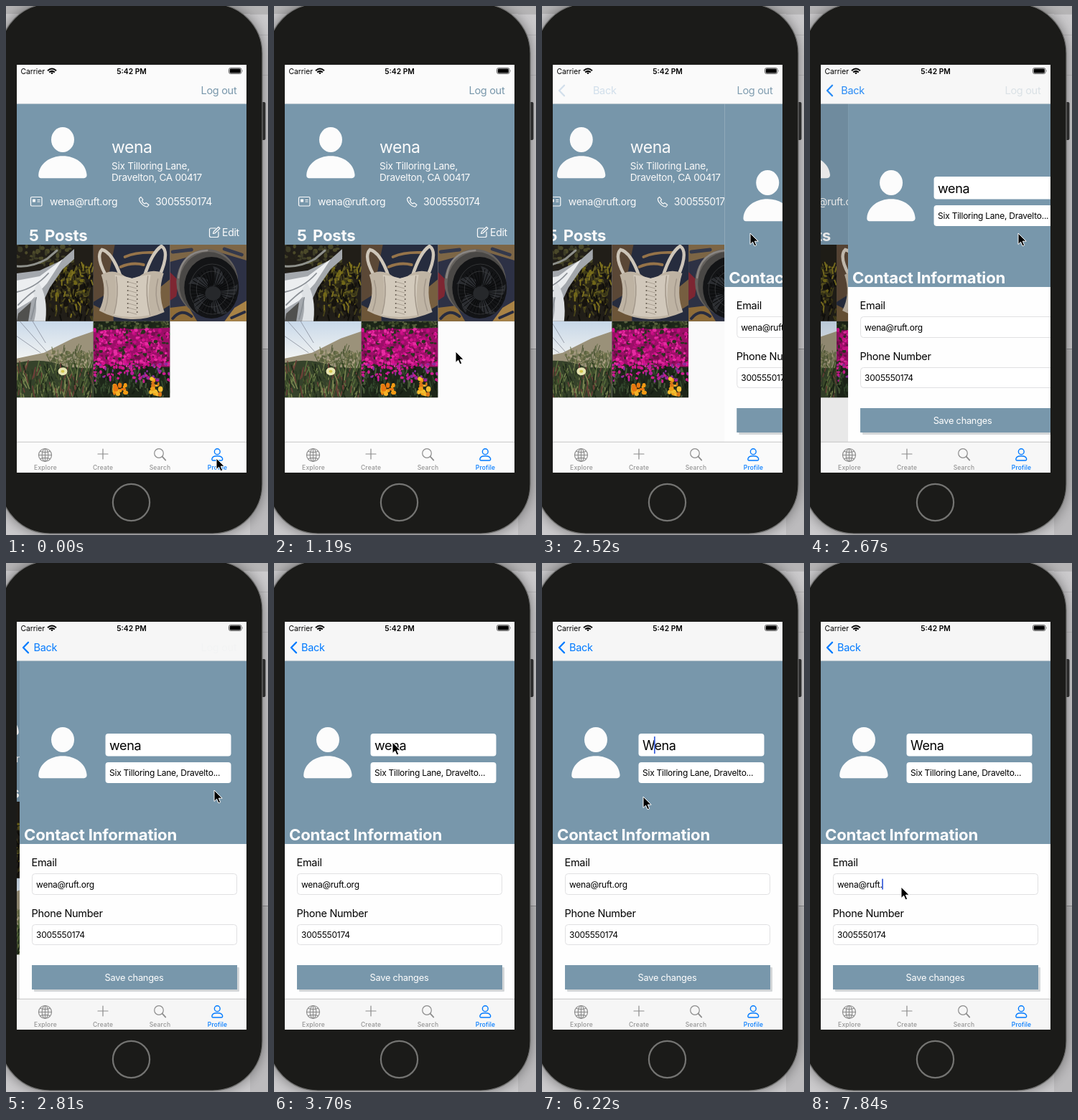
These frames come from a looping animation (365 px wide and 738 px high, 8 s). An HTML page:

```html
<!DOCTYPE html>
<html lang="en">
<head>
<meta charset="utf-8">
<title>Profile editing</title>
<style>
  html, body { margin: 0; width: 100%; height: 100%; overflow: hidden; background: #cbcacc; }
  #stage { display: block; width: 365px; height: 738px; }
  text { font-family: Inter, Roboto, "Liberation Sans", sans-serif; letter-spacing: -.02em; }
  .t14 { font-size: 14.5px; }
  .t12 { font-size: 12px; }
  .status { font-size: 10.3px; letter-spacing: 0; }
  .title { font-size: 22.2px; font-weight: 700; letter-spacing: -.01em; }
  .tab { font-size: 8.53px; font-weight: 500; letter-spacing: .02em; text-anchor: middle; }
  .line { fill: none; stroke-width: 1.2; stroke-linecap: round; stroke-linejoin: round; }
  .field { fill: #fff; stroke: #e0e0e2; }
</style>
</head>
<body>
<svg id="stage" viewBox="0 0 365 738">
  <defs>
    <clipPath id="screen"><rect x="15" y="82" width="320" height="569"/></clipPath>
    <linearGradient id="sky" x2="0" y2="1">
      <stop stop-color="#c9d9ea"/><stop offset=".5" stop-color="#f3f4f2"/>
    </linearGradient>
    <filter id="soft" x="0" y="0" width="1" height="1"><feGaussianBlur stdDeviation=".6"/></filter>
    <filter id="shade" x="-20%" y="-10%" width="140%" height="120%"><feGaussianBlur stdDeviation="9"/></filter>
    <g id="avatar" fill="#fcfcfc">
      <ellipse cx="34" cy="17.500" rx="16" ry="17.500"/>
      <path d="M5 71.300C1 71.300 0 69.500 .3 66C2 51 16 40.300 34 40.300S66 51 67.500 66C68 69.500 66 71.300 62 71.300Z"/>
    </g>
  </defs>

  <!-- desktop behind the phone -->
  <rect width="365" height="738" fill="#cbcacc"/>
  <rect width="365" height="11" fill="#b5b4b5"/>
  <path d="M340 11.500H365M340 40.500H365M340 96.500H365" stroke="#b9b8ba"/>
  <rect x="340" y="478" width="25" height="260" fill="#bcbbbd"/>
  <path d="M350 478.500H365" stroke="#8e8e90"/>

  <!-- phone -->
  <rect x="-8" y="-3" width="365" height="739" rx="69" opacity=".45" filter="url(#shade)"/>
  <rect x="355" y="134" width="6.500" height="53" rx="2" fill="#2b2b2b"/>
  <rect x="-8" y="-3" width="365" height="739" rx="69" fill="#1b1b19" stroke="#6f6f6e" stroke-width="1.200"/>
  <circle cx="174.500" cy="692.500" r="25.600" fill="none" stroke="#747472" stroke-width="2.200"/>

  <g clip-path="url(#screen)">
    <g id="list">
      <rect x="15" y="82" width="320" height="569" fill="#fcfcfc"/>
      <rect x="15" y="136.500" width="320" height="196.500" fill="#7897ab"/>
      <use href="#avatar" x="45" y="169"/>
      <g fill="#fcfcfc">
        <text x="147" y="205" font-size="23">wena</text>
        <g font-size="13.6">
          <text x="147" y="228">Six Tilloring Lane,</text>
          <text x="147" y="244">Dravelton, CA 00417</text>
        </g>
        <g font-size="14">
          <text x="61" y="278">wena@ruft.org</text>
          <text x="208" y="278">3005550174</text>
          <text x="301" y="320.500">Edit</text>
        </g>
        <text class="title" x="32" y="328">5</text>
        <text class="title" x="54" y="328">Posts</text>
        <rect x="37" y="269.500" width="4" height="4"/>
      </g>
      <g class="line" stroke="#fcfcfc">
        <rect x="34.500" y="266.500" width="15.500" height="12.500" rx="1.500"/>
        <path d="M44 270.500H47M44 273H47"/>
        <path d="M188 266.500L185.700 268.500C185 273 192 280.500 197 280L199 277.500L195.300 274.600L193.300 276C191.500 275.200 190 273.500 189.300 271.800L190.800 270Z"/>
        <path d="M292 310H285.500Q283.500 310 283.500 312V320.500Q283.500 322.500 285.500 322.500H294Q296 322.500 296 320.500V315M288.500 317.500L289.300 314.800L296 308.300L298 310.200L291.200 316.800Z"/>
      </g>
      <g id="photos"></g>
    </g>
    <rect id="dim" x="15" y="136.500" width="320" height="472" opacity="0"/>

    <g id="edit">
      <rect x="15" y="82" width="320" height="569" fill="#fefefe"/>
      <rect x="15" y="136.500" width="320" height="255.500" fill="#7897ab"/>
      <use href="#avatar" x="41" y="229"/>
      <rect x="134.500" y="238" width="175" height="31.500" rx="4" fill="#fff"/>
      <rect x="134.500" y="278" width="175" height="29" rx="4" fill="#fff"/>
      <text id="name" x="140" y="261" font-size="18">wena</text>
      <text class="t12" x="140" y="297">Six Tilloring Lane, Dravelto...</text>
      <text class="title" x="21" y="387" fill="#fefefe">Contact Information</text>
      <text class="t14" x="31.500" y="423">Email</text>
      <rect class="field" x="32.500" y="433.500" width="285" height="29" rx="4"/>
      <text id="mail" class="t12" x="38" y="452.500">wena@ruft.org</text>
      <text class="t14" x="31.500" y="493.500">Phone Number</text>
      <rect class="field" x="32.500" y="504.500" width="285" height="28" rx="4"/>
      <text class="t12" x="38" y="522.500">3005550174</text>
      <rect x="35" y="564" width="286" height="34" rx="1" fill="#d3d6d8"/>
      <rect x="32" y="561" width="286" height="34" fill="#7897ab"/>
      <text x="174.500" y="583" font-size="12.8" fill="#fefefe" text-anchor="middle">Save changes</text>
      <rect id="caret" width="1.800" rx=".5" fill="#3f63dc"/>
    </g>

    <!-- status and navigation bar -->
    <rect class="bar" x="15" y="82" width="320" height="54"/>
    <path d="M15 136.250H335" stroke="#c4c8ca" stroke-width=".5"/>
    <text class="status" x="20.500" y="94.500">Carrier</text>
    <text class="status" x="175" y="94.500" font-weight="600" text-anchor="middle">5:42 PM</text>
    <g fill="none" stroke="#000" stroke-width="2">
      <path d="M58 90.200Q64 84.800 70 90.200M60.200 92.500Q64 89.200 67.800 92.500"/>
      <path d="M62.200 93.200L64 95.300L65.800 93.200Q64 92 62.200 93.200Z" fill="#000" stroke="none"/>
    </g>
    <rect x="310.500" y="86.500" width="17.500" height="8" rx="2.200" fill="none" stroke="#555" stroke-width=".9"/>
    <rect x="311.700" y="87.500" width="15.100" height="6" rx="1.200"/>
    <path d="M329.200 89V92Q330.600 90.500 329.200 89Z" fill="#777"/>
    <text id="logout" class="t14" x="271.500" y="123" fill="#7897ab">Log out</text>
    <path id="chevron" class="line" d="M31 110.800L24 118L31 125.200" style="stroke-width:2.300"/>
    <text id="back" class="t14" x="38" y="123">Back</text>

    <!-- tab bar -->
    <rect class="bar" x="15" y="608" width="320" height="43"/>
    <path d="M15 608.250H335" stroke="#b8b8b8" stroke-width=".8"/>
    <g class="line" stroke="#8c8c8c">
      <circle cx="54.500" cy="626.500" r="9"/>
      <ellipse cx="54.500" cy="626.500" rx="4.300" ry="9"/>
      <path d="M54.500 617.500V635.500M45.500 626.500H63.500M47.500 621.300Q54.500 624 61.500 621.300M47.500 631.700Q54.500 629 61.500 631.700"/>
      <path d="M135 618V632M128 625H142"/>
      <circle cx="213" cy="624" r="6.300"/>
      <path d="M217.700 628.700L222.300 633.700" style="stroke-width:1.700"/>
    </g>
    <g class="line" stroke="#007aff" style="stroke-width:1.400">
      <circle cx="294.300" cy="621.700" r="3.900"/>
      <path d="M288.500 634Q286.500 634 287 631.500C288 626.500 300.500 626.500 301.600 631.500Q302 634 300 634Z"/>
    </g>
    <g fill="#949494">
      <text class="tab" x="55" y="647.300">Explore</text>
      <text class="tab" x="135" y="647.300">Create</text>
      <text class="tab" x="214.500" y="647.300">Search</text>
      <text class="tab" x="294.500" y="647.300" fill="#007aff">Profile</text>
    </g>
  </g>

  <path id="pointer" d="M0 0V15.500L3.600 12.200L6 17.800L8.700 16.700L6.300 11.200H11.200Z" stroke="#fff" stroke-width="1" stroke-linejoin="round"/>
</svg>

<script>
const $ = id => document.getElementById(id);

// ---- photos ----
let seed = 7;
const rand = (a = 0, b = 1) => {
  seed = (seed * 16807) % 2147483647;
  return a + (b - a) * seed / 2147483647;
};
const box = fill => `<rect width="107" height="107" fill="${fill}"/>`;
const shape = (d, fill) => `<path d="${d}" fill="${fill}"/>`;
const stroke = (d, color, w) => `<path d="${d}" fill="none" stroke="${color}" stroke-width="${w}" stroke-linecap="round"/>`;
const disc = (x, y, rx, ry, fill) => `<ellipse cx="${x}" cy="${y}" rx="${rx}" ry="${ry}" fill="${fill}"/>`;
const many = (n, make) => Array.from({ length: n }, (_, i) => make(i)).join("");
const pick = list => list[Math.floor(rand(0, list.length))];
const blobs = (n, [x0, y0, x1, y1], colors, r) => many(n, () =>
  disc(rand(x0, x1), rand(y0, y1), rand(r / 3, r), rand(r / 3, r), pick(colors)));
const blades = (n, [x0, y0, x1, y1], colors, h, w = 1.5) => many(n, () =>
  stroke(`M${rand(x0, x1)} ${rand(y0, y1)}l${rand(-h / 3, h / 3)} ${rand(-h, -h / 3)}`, pick(colors), w));

const waterfall = () => box("#211e18")
  + blobs(70, [0, 0, 80, 28], ["#3d3c26", "#4b4929", "#232018"], 4)
  + blobs(160, [46, 28, 100, 85], ["#5c5520", "#716719", "#2b2714", "#3b3818", "#16130e"], 4)
  + blades(90, [44, 30, 107, 107], ["#7d711f", "#15120d", "#45401b", "#0f0e0b"], 9, 2)
  + shape("M80 6L62 22L32 36L0 40V107H26L32 90L46 60L64 34L80 20Z", "#a4a8ad")
  + shape("M0 50L32 44L64 20L42 54L20 78L0 90Z", "#eceef0")
  + shape("M30 52Q44 72 40 107H24Q31 80 22 66Z", "#dfe2e5")
  + shape("M2 96L20 80L16 107H0Z", "#50504e")
  + stroke("M0 66Q25 61 44 40M2 84Q16 70 25 64M20 104Q25 86 27 74", "#8b9096", 1.800)
  + stroke("M0 30Q20 32 42 20L56 8", "#8f918c", 3);

const corset = () => box("#262c3e")
  + shape("M0 0H30L16 70L0 80Z", "#5b4836") + shape("M0 84L28 98V107H0Z", "#6d5638")
  + stroke("M44 17Q60 10 84 11M38 31Q54 24 70 28", "#96744a", 4)
  + shape("M90 62L107 48V84L94 92Z", "#775f40")
  + stroke("M17 42Q3 16 12 7Q26 10 38 44M71 44Q82 10 95 2Q107 10 92 44", "#cfc7ba", 4.500)
  + shape("M11 42Q28 32 44 44Q53 50 64 44Q81 32 98 40Q89 67 99 94Q74 105 52 104Q28 103 8 92Q20 68 11 42Z", "#bfb4a4")
  + shape("M30 42Q44 44 54 47Q70 42 80 42Q74 70 80 98Q52 104 28 98Q35 70 30 42Z", "#d3cabc")
  + stroke("M32 45Q36 70 29 96M76 44Q72 70 79 98M18 50Q24 70 16 92M90 48Q84 70 92 92", "#a2978a", 1.500)
  + many(8, i => disc(48, 52 + i * 6, 1, 1, "#62594e") + disc(61, 52 + i * 6, 1, 1, "#62594e")
    + stroke(`M49 ${52 + i * 6}L60 ${55 + i * 6}`, "#a0968a", .8));

const fan = () => box("#2d3145")
  + shape("M0 0H107V22L60 8L0 24Z", "#7d6646") + stroke("M4 10L30 7M76 6L100 14", "#34394c", 5)
  + shape("M0 38L12 50L9 72L0 78Z", "#7e2632")
  + shape("M0 88L25 85L38 107H0Z", "#8e6c38") + shape("M90 88L107 78V107H76Z", "#a98346")
  + stroke("M4 103Q16 88 30 100M86 102L104 94", "#282c40", 4)
  + disc(52, 52, 43, 46, "#66625e") + disc(54, 55, 41, 45, "#4a4846")
  + disc(58, 60, 38, 43, "#131416")
  + many(5, i => `<g transform="rotate(${i * 72} 60 66)">${shape("M60 58Q66 44 60 30Q78 34 74 54Z", "#2b2d31")}</g>`)
  + many(36, i => `<g transform="rotate(${i * 10} 60 66)">${stroke("M60 56V34", "#08090a", .9)}</g>`)
  + many(2, i => `<ellipse cx="59" cy="62" rx="${22 + i * 9}" ry="${25 + i * 10}" fill="none" stroke="#404143" stroke-width=".7"/>`)
  + disc(60, 68, 11, 10, "#26282b") + stroke("M12 46Q16 10 52 8", "#8a8683", 2.500);

const dune = () => box("url(#sky)")
  + shape("M0 52L38 44L78 24L107 14V80H0Z", "#9b927a")
  + blobs(120, [42, 42, 107, 70], ["#74754f", "#aaa080", "#5c6340"], 3)
  + stroke("M4 0L42 43M22 0L40 30M0 21L33 44", "#7b8290", .7)
  + shape("M0 58Q38 50 70 64L107 66V107H0Z", "#35422a")
  + blades(230, [-4, 68, 110, 114], ["#5f7340", "#2a3820", "#7d8752", "#6d4038", "#1c2617", "#43542d"], 16)
  + blades(40, [46, 40, 107, 66], ["#677049", "#4c5535"], 12, 1)
  + disc(64, 70, 6.500, 5.500, "#e9e7b3") + disc(64, 70, 2.500, 2, "#d2c550");

const flowers = () => box("#1d2619")
  + blobs(110, [0, 0, 107, 12], ["#3c4a28", "#1a2417", "#59623e"], 3)
  + shape("M0 13L107 9V64L0 60Z", "#9c0f68")
  + blobs(420, [0, 11, 107, 66], ["#d3138c", "#c20d80", "#e72ca2", "#760e4e", "#2b3420"], 3)
  + blades(150, [0, 70, 107, 112], ["#33472d", "#4a5c3a", "#141c12", "#25331f"], 9, 2)
  + blobs(75, [0, 58, 107, 84], ["#ba1b9b", "#d21a91", "#8b2e9a"], 3)
  + blobs(16, [28, 88, 45, 102], ["#f39b13", "#e97911", "#f5b329"], 4)
  + blobs(14, [80, 78, 97, 103], ["#f1a016", "#d97718", "#f4be31"], 4);

const CELL = 320 / 3;
$("photos").innerHTML = [waterfall, corset, fan, dune, flowers].map((draw, i) =>
  `<svg x="${15 + (i % 3) * CELL}" y="${333 + Math.floor(i / 3) * CELL}" width="${CELL}" height="${CELL}" viewBox="0 0 ${CELL} ${CELL}">${box("#444")}<g filter="url(#soft)">${draw()}</g></svg>`).join("");

// ---- motion ----
const LOOP = 8000, STEP = 148, LAST = 53;

// pointer positions, by the step at which each run begins
const runs = {
  0: [[293, 631]],
  5: [[291, 620], [281, 588], [266, 540], [253, 482], [247, 424], [256, 366], [269, 331], [281, 313]],
  13: [[285, 312], [292, 320], [290, 317]],
  23: [[276, 306], [218, 275], [165, 250], [160, 248], [168, 248], [174, 249]],
  42: [[141, 326], [104, 392], [79, 438], [97, 452], [121, 455], [130, 456]],
  49: [[127, 452]]
};
const path = [];
for (const [start, points] of Object.entries(runs)) points.forEach((p, i) => { path[+start + i] = p; });
for (let i = 1; i <= LAST; i++) path[i] ??= path[i - 1];

// [from step, name, mail, focused field, caret index]
const edits = [
  [0, "wena", "wena@ruft.org", "", 0],
  [27, "wena", "wena@ruft.org", "name", 4],
  [32, "wena", "wena@ruft.org", "name", 3],
  [33, "wena", "wena@ruft.org", "name", 2],
  [34, "wena", "wena@ruft.org", "name", 1],
  [36, "ena", "wena@ruft.org", "name", 0],
  [39, "Wena", "wena@ruft.org", "name", 1],
  [47, "Wena", "wena@ruft.org", "mail", 13],
  [51, "Wena", "wena@ruft.or", "mail", 12],
  [52, "Wena", "wena@ruft.o", "mail", 11],
  [53, "Wena", "wena@ruft.", "mail", 10]
];

// critically damped push transition
const push = ms => {
  if (ms <= 0) return 0;
  const u = ms * .01826;
  return u > 8.500 ? 1 : 1 - (1 + u) * Math.exp(-u);
};

function placeCaret(field, index) {
  const caret = $("caret");
  caret.style.display = field ? "" : "none";
  if (!field) return;
  const text = $(field);
  const width = index ? text.getSubStringLength(0, index) : 0;
  caret.setAttribute("x", +text.getAttribute("x") + width - .5);
  caret.setAttribute("y", field === "name" ? 242 : 440.500);
  caret.setAttribute("height", field === "name" ? 24 : 15);
}

function render(step) {
  const p = push(step * STEP - 2463);
  $("list").setAttribute("transform", `translate(${-96 * p} 0)`);
  $("edit").setAttribute("transform", `translate(${320 * (1 - p)} 0)`);
  $("dim").setAttribute("opacity", .1 * p * p);
  $("logout").setAttribute("opacity", 1 - p * p);
  const tint = `color-mix(in srgb, #007aff ${p * 100}%, #7897ab)`;
  $("chevron").style.stroke = $("back").style.fill = tint;
  $("chevron").setAttribute("opacity", p);
  $("back").setAttribute("opacity", p);
  $("back").setAttribute("x", 38 + 44 * (1 - p));
  const tone = Math.round(251 - 5 * p);
  document.querySelectorAll(".bar").forEach(bar => bar.setAttribute("fill", `rgb(${tone},${tone},${tone})`));

  const [, name, mail, field, index] = edits.findLast(e => e[0] <= step);
  $("name").textContent = name;
  $("mail").textContent = mail;
  placeCaret(field, index);
  $("pointer").setAttribute("transform", `translate(${path[step]})`);
}

let shown = -1;
const begin = performance.now();
function tick(now) {
  const t = Math.max(0, now - begin) % LOOP;
  const step = Math.min(LAST, Math.floor((t + 8) / STEP));
  if (step !== shown) render(shown = step);
  requestAnimationFrame(tick);
}
tick(begin);
</script>
</body>
</html>
```
